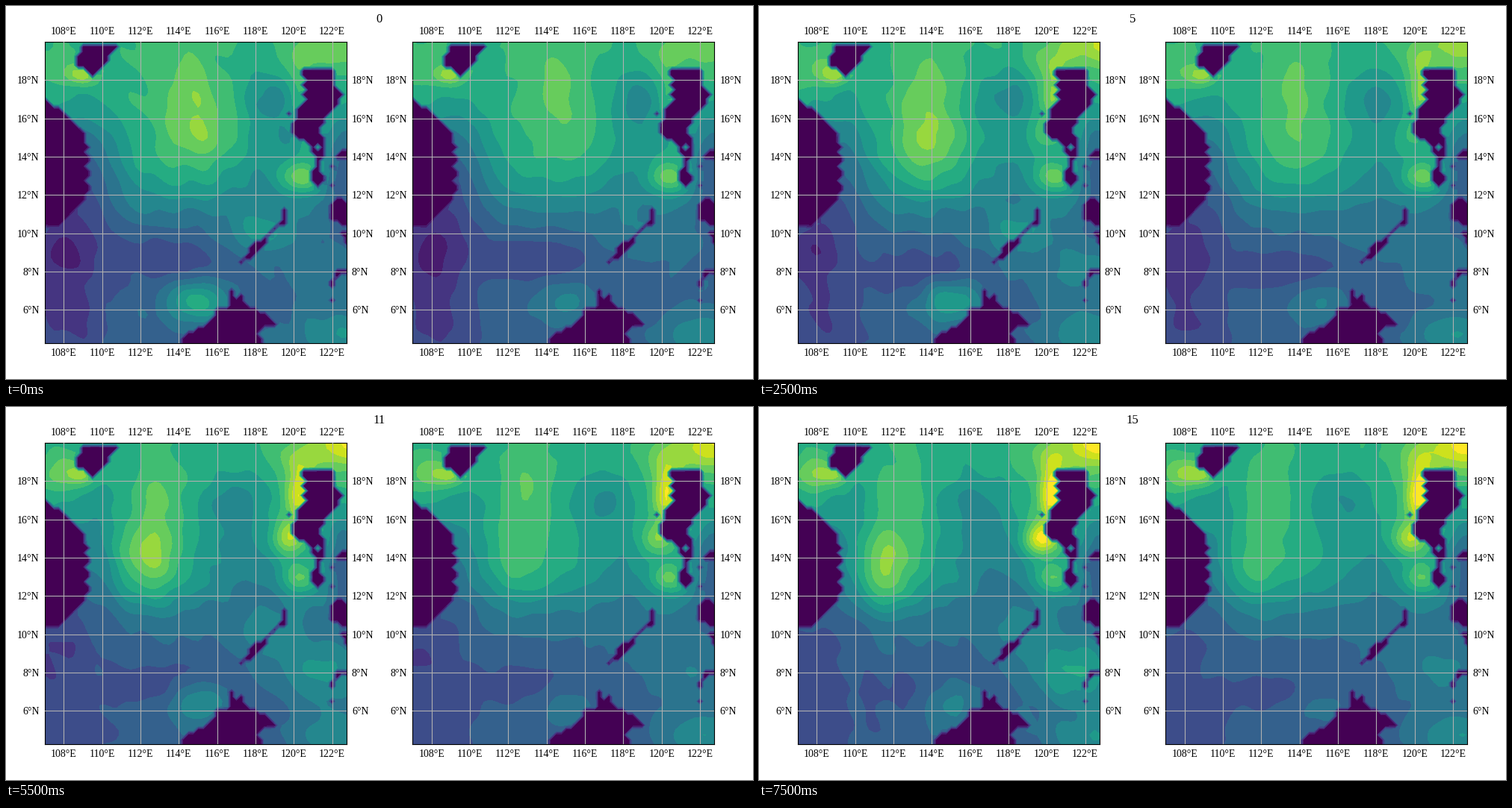
Recreate the animation shown at these times as a matplotlib script. Size 1000 by 500 pixels, loop 8000 ms.

```python
import numpy as np
import matplotlib.pyplot as plt
from matplotlib.animation import FuncAnimation
from matplotlib.path import Path

W, H, DPI = 1000, 500, 100
DAYS, STEP_MS = 16, 500
N = 64

plt.rcParams["font.family"] = "Liberation Serif"

lon = np.linspace(107, 122.75, N)
lat = np.linspace(20, 4.25, N)
LON, LAT = np.meshgrid(lon, lat)
COL, ROW = np.meshgrid(np.arange(N), np.arange(N))


# ---------- land, in grid columns and rows ----------
def inside(*corners):
    cells = np.column_stack([COL.ravel(), ROW.ravel()])
    return Path(corners).contains_points(cells).reshape(N, N)


# western mainland: a slope, a jagged shore, a slope back
shore = np.minimum(np.round(1.2 * (ROW - 11.8)), 41 - ROW)
shore = np.minimum(shore, 8 + ((ROW > 21) & (ROW % 3 != 2)))
land = (COL <= shore) & (ROW < 39)

# northern island
land |= inside((7.6, .6), (15.4, .6), (15.3, 1.5), (13.4, 3.5), (13.4, 4.3),
               (11.4, 6.4), (10, 7.4), (8.6, 5.6), (6.6, 5.4), (6.6, 2.6), (7.6, 2.4))
# large eastern island with its tail, a toothed west shore and a lagoon
land |= inside((53.6, 5.6), (60.4, 5.6), (60.4, 9.2), (62.4, 11), (60.4, 14.3),
               (58.4, 16), (57.5, 18.5), (58.4, 20), (58.4, 23.4), (57.4, 25.5),
               (58.4, 28), (58.3, 29.3), (57, 30.5), (54.6, 27.2), (56.4, 26.4),
               (56.6, 24), (55.6, 22.4), (54.6, 20.9), (51.6, 19.4), (51.6, 16.6),
               (52.6, 16.4), (52.6, 13.6), (53.6, 13.4))
land[8:13:2, 54] = False
land[22, 57] = False
# southern island
land |= inside((38.6, 51.7), (39.4, 51.7), (40, 53.5), (41, 52.6), (41.4, 52.8),
               (42.4, 55.4), (46.4, 56.6), (48.4, 59.3), (45.3, 59.7), (44.3, 61),
               (46.4, 63.5), (28.6, 63.5), (28.9, 62), (29.6, 60.8), (32.8, 59.6),
               (35.6, 57), (35.6, 55.6), (38, 55.4))
# slanted narrow island
land |= inside((40.6, 46.3), (44, 41.6), (46.4, 41.6), (46.4, 42.5), (43.4, 45.4))
land |= (COL + ROW == 87) & (COL >= 46) & (COL < 50)
land[35:39, 50] = True
# eastern edge
land |= inside((60.5, 24.4), (62, 22.6), (63.5, 22.6), (63.5, 24.4))
land |= inside((59.6, 33.5), (60.5, 32.6), (62.4, 32.6), (63.5, 33.5), (63.5, 38.4), (59.6, 37.4))
land |= inside((61.6, 39.6), (63.5, 39.6), (63.5, 42.4), (62.6, 42.4))
land |= inside((60.6, 47.6), (63.5, 47.6), (63.5, 48.4), (61.4, 48.6), (60.4, 50.4), (59.6, 50.4))
# islets
land[15, 51] = land[26, 60] = land[30, 60] = land[51, 60] = land[54, 60] = True


# ---------- sea level ----------
def ripples(seed, t):
    rng = np.random.default_rng(seed)
    z = 0
    for kx, ky, phase, speed in rng.uniform([-4, -4, 0, -6], [4, 4, 6.28, 6], (9, 4)):
        z = z + np.sin(kx * LON + ky * LAT + phase + speed * t)
    return z


def sea(t, fine, seed):
    """Surface at t = 0..1; fine scales the small eddies."""

    def ramp(a, b):
        return a + (b - a) * t

    def bump(x, y, sx, sy, height):
        return height * np.exp(-((LON - x) / sx) ** 2 / 2 - ((LAT - y) / sy) ** 2 / 2)

    # warm north, cool south
    z = 4.6 + 4.4 / (1 + np.exp((11.8 - LAT) / 0.9))

    # warm eddy drifting south-west, with a ridge to its north
    z += bump(ramp(115, 111.5), ramp(15.6, 13.3), ramp(1.3, 1), 1.5, fine * ramp(1.9, 3.4))
    z += bump(ramp(114.5, 112.2), ramp(18.3, 17.5), 0.9, 1.5, ramp(1.1, 1.5))
    # cool pools in the centre
    z += bump(ramp(119, 116.2), 17, 1.3, 1.3, ramp(-2.4, -1.8))
    z += bump(116.5, 14, 1.5, 2, fine * ramp(0, -1.8))
    z += bump(118.3, 13.3, 1.2, 1.6, -1.3)
    # western shore
    z += bump(109, 13.6, 1.5, 2.2, ramp(-4, -2.2))
    z += bump(109.5, 18, 2.5, 2, ramp(0, -1))
    z += bump(108, 18.4, 0.9, 0.7, ramp(0.8, 3))
    z += bump(109, 18.3, 0.5, 0.35, ramp(2.8, 2))
    # shores of the large eastern island
    z += bump(122.8, 20, 1.3, 1, ramp(1.8, 4.8))
    z += bump(120.3, 19.3, 0.9, 0.7, ramp(1.2, 1.5))
    z += bump(120.3, 17.3, 0.5, 1.1, ramp(1.5, 5.3))
    z += bump(119.7, 15, 0.6, 0.55, (0.4 + 0.6 * fine) * ramp(-1, 5.2))
    z += bump(120.4, 12.9, 0.7, 0.5, ramp(3.2, 2.6))
    z += bump(122.7, 13.8, 0.9, 1.8, ramp(-4.2, -3.8))
    # cool south-west
    z += bump(ramp(107.9, 107.2), 8.8, 1.4, 1.8, ramp(-2.8, -1.2))
    z += bump(108.3, 5, 1.6, 1.3, ramp(-1.6, -1.1))
    z += bump(ramp(113.5, 112.7), ramp(8.7, 7), 2.2, 0.9, ramp(-1.6, -1))
    # warm south-east
    z += bump(115, 6.4, 1.1, 0.8, fine * ramp(3.8, 2.2))
    z += bump(122.2, 4.7, 1.5, 0.8, 2.4)
    z += bump(121.5, 8, 1.6, 1.2, fine * ramp(0.7, 3.6))
    z += bump(118.3, 10, 1.2, 0.9, fine * ramp(2.4, 1.6))

    z += 0.07 * fine * ripples(seed, t)
    return np.where(land, 0, np.clip(z, 1.2, 13.9))


# ---------- figure ----------
fig = plt.figure(figsize=(W / DPI, H / DPI), dpi=DPI, facecolor="white")


def make_map(x):
    ax = fig.add_axes([x / W, (H - 452.3) / H, 404.38 / W, 404.2 / H])
    ax.set_xlim(107, 122.75)
    ax.set_ylim(4.25, 20)
    xt, yt = range(108, 123, 2), range(6, 19, 2)
    ax.set_xticks(xt, [f"{v}°E" for v in xt])
    ax.set_yticks(yt, [f"{v}°N" for v in yt])
    ax.tick_params(length=0, pad=5, labelsize=10, labeltop=True, labelright=True)
    ax.set_axisbelow(False)
    ax.grid(color="#b0b0b0", linewidth=0.8)
    return ax


# axes, share of small eddies, ripple seed
panels = [(make_map(51.58), 1, 4), (make_map(543.95), 0.45, 9)]
title = fig.suptitle("0", fontsize=12, y=0.98)
drawn = []


def draw(day):
    while drawn:
        drawn.pop().remove()
    for ax, fine, seed in panels:
        z = sea(day / (DAYS - 1), fine, seed)
        drawn.append(ax.contourf(lon, lat, z, levels=np.arange(15), cmap="viridis",
                                 vmin=0.5, vmax=13.5))
    title.set_text(str(day))


anim = FuncAnimation(fig, draw, frames=DAYS, init_func=lambda: draw(0),
                     interval=STEP_MS, repeat=True, repeat_delay=0, blit=False)
plt.show()
```
